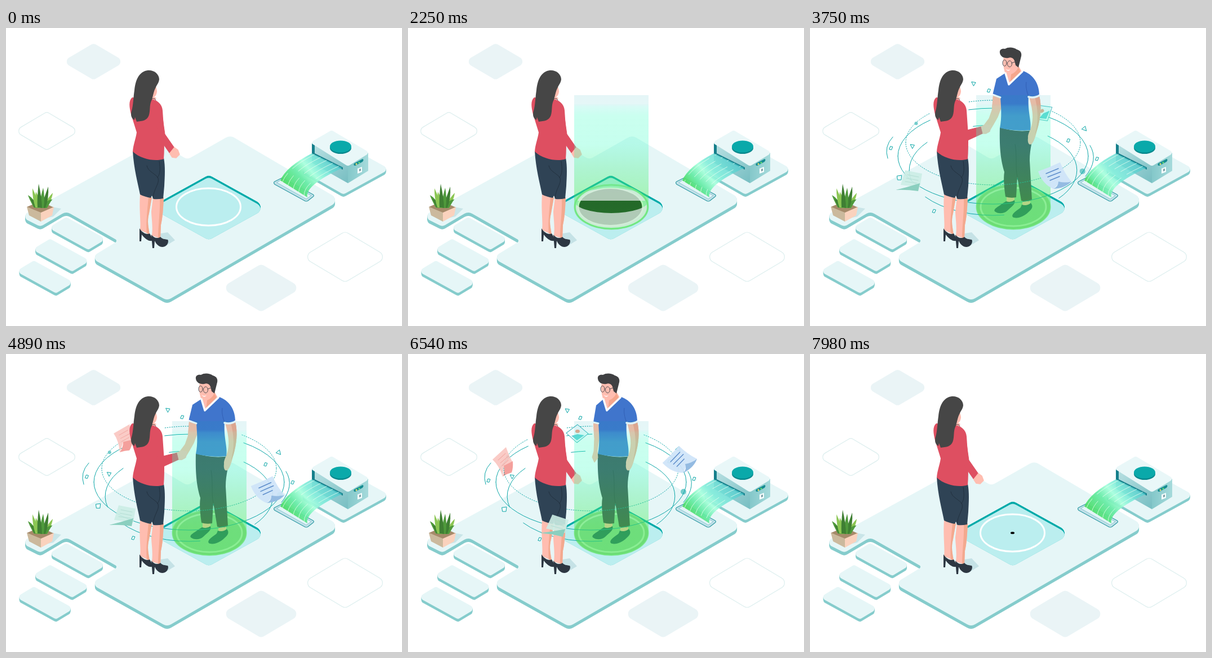
These frames come from a looping animation (703 px wide and 528 px high, 8 s). An HTML page with a canvas:

```html
<!DOCTYPE html>
<html lang="en">
<head>
<meta charset="utf-8">
<title>Hologram meeting</title>
<style>
html, body { margin: 0; width: 100%; height: 100%; overflow: hidden; background: #fff; }
canvas { display: block; }
</style>
</head>
<body>
<canvas id="stage" width="703" height="528"></canvas>
<script>
const c = document.getElementById('stage').getContext('2d');
const LOOP = 8000, TEAL = '#0aa5a6', SKIN = '#ffbdb0';
const clamp = x => Math.max(0, Math.min(1, x));
const lerp = (a, b, k) => a + (b - a) * k;
const ramp = (t, a, b) => { const k = clamp((t - a) / (b - a)); return k * k * (3 - 2 * k); };
const pulse = (t, a, b, d, e) => ramp(t, a, b) * (1 - ramp(t, d, e));

function shape(d, fill, stroke, w = 1) {
  const p = new Path2D(d);
  if (fill) { c.fillStyle = fill; c.fill(p); }
  if (stroke) { c.strokeStyle = stroke; c.lineWidth = w; c.stroke(p); }
}
function oval(x, y, rx, ry, fill, stroke, w = 1) {
  c.beginPath();
  c.ellipse(x, y, rx, ry, 0, 0, Math.PI * 2);
  if (fill) { c.fillStyle = fill; c.fill(); }
  if (stroke) { c.strokeStyle = stroke; c.lineWidth = w; c.stroke(); }
}
// points are [x, y, cornerRadius]
function rounded(pts) {
  const p = new Path2D(), n = pts.length, last = pts[n - 1];
  p.moveTo((last[0] + pts[0][0]) / 2, (last[1] + pts[0][1]) / 2);
  pts.forEach((a, i) => {
    const b = pts[(i + 1) % n];
    p.arcTo(a[0], a[1], b[0], b[1], a[2]);
  });
  p.closePath();
  return p;
}
const rhomb = (x, y, w, h, r) => rounded([[x, y - h, r], [x + w, y, r], [x, y + h, r], [x - w, y, r]]);
function slab(path, depth, top = '#e6f6f7', side = '#85cccc') {
  c.save();
  c.fillStyle = side;
  for (let i = 0; i < depth; i++) { c.translate(0, 1); c.fill(path); }
  c.restore();
  c.fillStyle = top;
  c.fill(path);
}
function poly(pts, fill, soft = 0) {
  c.beginPath();
  for (let i = 0; i < pts.length; i += 2) c.lineTo(pts[i], pts[i + 1]);
  c.closePath();
  c.fillStyle = fill;
  c.fill();
  if (soft) { c.strokeStyle = fill; c.lineWidth = soft; c.lineJoin = 'round'; c.stroke(); }
}
const morph = (a, b, k) => a.map((v, i) => lerp(v, b[i], k));
function linear(x0, y0, x1, y1, stops) {
  const g = c.createLinearGradient(x0, y0, x1, y1);
  stops.forEach(([k, col]) => g.addColorStop(clamp(k), col));
  return g;
}

const floor = rounded([[398, 190, 16], [594, 305, 10], [286, 483, 14], [150, 407, 8], [199, 377, 3],
  [107, 325, 14], [61, 352, 10], [25, 334, 8], [268, 201, 8], [322, 233, 12]]);
const pad = rounded([[605, 208, 6], [681, 250, 6], [599, 295, 8], [520, 250, 6]]);
const step = rounded([[107, 335, 6], [178, 374, 6], [146, 393, 6], [75, 354, 6]]);
const inset = rhomb(360, 318, 105, 58, 12);

function ground() {
  for (const [x, y, w, h, r] of [[155.5, 59.5, 55.5, 32.5, 8], [453, 460.5, 72, 42.5, 10]]) {
    c.fillStyle = '#eaf4f6';
    c.fill(rhomb(x, y, w, h, r));
  }
  c.strokeStyle = '#dceeee';
  c.lineWidth = 1.2;
  c.stroke(rhomb(72.5, 182.5, 57.5, 34, 8));
  c.stroke(rhomb(602, 405.5, 76, 45, 10));
  slab(floor, 6);
  for (let i = 0; i < 3; i++) {
    c.save();
    c.translate(-28.7 * i, 38.5 * i);
    slab(step, 5);
    c.restore();
  }
  slab(pad, 5);
  c.save();
  c.clip(inset);
  c.fillStyle = '#00aaa9';
  c.fill(inset);
  c.translate(0, 4);
  c.fillStyle = '#bbeeef';
  c.fill(inset);
  c.restore();
}

function plant() {
  shape('M66 338L82 317L98 320L84 334Z', '#c9e5e8');
  shape('M37 317L61 307L85 318L62 328Z', '#a68a6a');
  const tips = [[39, 296], [83, 292], [43, 304], [83, 304], [47, 284], [75, 281], [66, 283], [53, 290], [58, 276]];
  const greens = ['#4f9a3c', '#8bc653', '#3f7f33'];
  tips.forEach(([x, y], i) => {
    const b = lerp(61, x, .35);
    shape(`M${b - 4} 318Q${lerp(b, x, .6) - 4} 302 ${x} ${y}Q${lerp(b, x, .6) + 5} 302 ${b + 4} 319Z`, greens[i % 3]);
  });
  shape('M37 317L62 327L62 343L41 332Z', '#cbb99d');
  shape('M62 327L85 317L82 332L62 343Z', '#fad2bd');
}

function printer(t) {
  shape('M543 203L607 241V275L543 239Z', linear(543, 210, 607, 270, [[0, '#b8e0e2'], [1, '#79bfc3']]));
  shape('M607 241L643 221V253L607 275Z', linear(607, 250, 643, 250, [[0, '#84c8ca'], [1, '#a5dadb']]));
  c.fillStyle = '#e9f7f8';
  c.fill(rounded([[578, 181, 5], [646, 221, 4], [607, 245, 6], [540, 203, 4]]));
  shape('M543 205L548 208V222L598 247V251L543 223Z', '#167f8b');
  oval(594, 212.5, 19, 10.5, '#08888d');
  oval(594, 210, 19, 10.5, '#0aa9aa');
  shape('M618 240L633 232Q636 233 633 237L620 244Q616 244 618 240Z', '#168c91');
  oval(622, 241, 1.5, 1.5, '#f5e26c');
  oval(627, 238.5, 1.5, 1.5, '#68dd72');
  shape('M624 249L632 246V255L624 258Z', '#f5fcfc');
  shape('M627 250L630 249V253L627 254Z', '#7d9da5');

  shape('M489 266Q491 265 493 267L545 295Q548 297 545 299L536 306Q533 308 530 306L477 277Q474 274 477 272Z', '#c2e1e9', '#329ca5', 1.2);
  shape('M489 269L542 297L533 303L481 274Z', '#e3f4f7', '#79bdc8', .8);
  const sheen = .5 + .22 * Math.sin(t / LOOP * Math.PI * 10);
  const grad = linear(580, 222, 506, 288, [[0, 'rgba(65,195,205,.65)'], [sheen - .15, 'rgba(120,235,215,.85)'],
    [sheen, 'rgba(165,255,220,.9)'], [sheen + .2, 'rgba(100,235,165,.92)'], [1, 'rgba(78,220,102,.95)']]);
  shape('M543 222Q497 246 487 270L535 300Q530 279 597 248Z', grad);
  c.save();
  c.setLineDash([46, 12]);
  c.lineDashOffset = -t / LOOP * 58 * 8;
  for (let i = 0; i < 5; i++) {
    const u = .08 + i * .2, at = (a, b) => lerp(a, b, u);
    shape(`M${at(543, 597)} ${at(222, 248)}Q${at(497, 532)} ${at(246, 277)} ${at(487, 535)} ${at(270, 300)}`,
      null, 'rgba(235,255,240,.75)', 1);
  }
  c.restore();
}

function woman(k) {
  shape('M262 366L287 362L300 376L282 387Z', '#c5e2e6');
  shape('M238 294L259 300L254 328C250 343 253 353 255 366L238 358C240 345 236 325 238 294Z', SKIN);
  shape('M253 300L259 300L254 328C250 343 253 353 255 366L250 364C248 345 251 322 253 300Z', '#f3a98f');
  shape('M261 300H280C279 322 278 336 275 349L274 373L259 368C261 350 258 336 258 325Z', SKIN);
  shape('M273 300H280C279 322 278 336 275 349L274 373L270 372C270 350 274 325 273 300Z', '#f3a98f');
  shape('M237 355L237 378H240L241 366C247 374 255 380 262 376L255 364C250 367 242 363 237 355Z', '#2d3742');
  shape('M258 366L260 390H263L264 377C268 386 275 390 282 387C288 384 289 377 287 375C281 374 277 374 274 370C270 374 262 372 258 366Z', '#2d3742');
  shape('M225 218C240 228 265 233 280 230C283 245 282 262 281 280L279 302Q270 304 262 303L259 297L257 301Q246 299 238 295C234 275 227 250 225 218Z', '#2f4355');
  shape('M250 244C252 255 266 258 270 266C273 276 262 284 261 302M272 236C274 250 274 258 269 265', null, '#22313f', 1);
  shape('M255 118L267 124L262 130L254 128Z', SKIN);
  shape('M263 98C266 102 268 109 268 113C267 119 265 122 260 123L256 110Z', SKIN);
  shape('M224 123C217 129 219 141 222 153L232 185C230 198 226 206 225 219C240 233 266 237 280 232C281 220 281 206 281 190L278 146C277 134 268 127 256 126Z', '#de4f61');
  poly(morph([298, 211, 305, 216, 308, 224, 302, 230, 295, 229, 290, 221],
    [303, 175, 312, 171, 321, 173, 319, 183, 312, 187, 305, 187], k), SKIN, 1.5);
  poly(morph([278, 160, 282, 188, 298, 211, 290, 221, 276, 201, 267, 175],
    [277, 160, 279, 181, 303, 175, 306, 187, 280, 199, 267, 185], k), '#de4f61', 1);
  shape('M258 126Q264 123 266 128', null, '#5c3c45', 1);
  shape('M252 75C262 74 272 81 272 91C271 98 268 100 266 105C262 112 261 121 259 127C255 135 256 140 255 148C254 159 249 164 239 165L232 166L229 158L228 163C222 160 221 153 223 147C226 137 226 123 228 110C230 92 236 77 252 75Z', '#464646');
}

function man(k) {
  shape('M349 297H363V308H349ZM377 304H391V314H377Z', '#ffc2a8');
  shape('M348 307Q356 310 363 305C366 312 357 317 350 324C343 330 333 329 328 325C325 320 336 316 340 312Z', '#1a625f');
  shape('M376 313Q385 316 392 310C397 316 394 321 388 326C380 334 367 339 360 335C356 329 370 322 374 318Z', '#1a625f');
  shape('M337 176C355 182 375 184 396 181C396 200 390 212 390 235L394 305Q384 309 375 306L368 264L366 300Q356 302 347 299C345 285 343 268 345 255C339 235 336 215 337 176Z', '#374249');
  shape('M364 206C368 225 364 246 368 264', null, '#29343a', 1);
  shape('M389 122L407 120C412 140 409 160 404 178C400 193 398 201 393 206C388 208 386 202 387 195C386 188 392 180 394 170C397 155 394 140 389 122Z', '#ffbda5');
  shape('M399 122L407 120C412 140 409 160 404 178L399 190C406 165 405 145 399 122Z', '#f5a68c');
  poly(morph([329, 121, 338, 122, 339, 150, 336, 172, 337, 184, 331, 192, 327, 183, 330, 172, 331, 150, 330, 135],
    [325, 120, 338, 122, 339, 142, 333, 158, 325, 172, 317, 185, 307, 182, 309, 172, 318, 160, 323, 146], k), '#ffbda5', 1);
  shape('M344 50L364 52L370 67L376 77L354 101L347 82C343 70 342 60 344 50Z', SKIN);
  shape('M357 82Q366 79 370 69L374 78L355 99Z', '#f5a68c');
  poly(morph([348, 79, 334, 91, 329, 121, 341, 124], [348, 79, 331, 90, 324, 119, 341, 124], k), '#4075cc');
  shape('M347 79L353 100L378 76C396 82 407 98 407 119C401 123 394 123 388 121C386 150 394 165 391 181C375 183 352 181 337 177C341 158 339 140 338 122Z', '#4075cc');
  shape('M388 121C384 111 383 103 384 96', null, '#315fb5', 1);
  shape('M347 80L353 100L377 77M388 122Q398 125 408 119', null, '#f7fbff', 3.5);
  const cuff = morph([329, 121, 338, 123], [324, 118, 338, 123], k);
  shape(`M${cuff[0]} ${cuff[1]}L${cuff[2]} ${cuff[3]}`, null, '#f7fbff', 3);
  shape('M337 44C336 38 341 36 346 37C352 33 362 34 367 38C375 40 376 46 375 50L372 62L370 70L365 66L363 58C361 53 357 51 352 53C345 54 338 51 337 44Z', '#3f4042');
  oval(345.5, 62, 3.5, 5.5, null, '#4c4c50', 1);
  oval(354.5, 63.5, 4, 5.5, null, '#4c4c50', 1);
  shape('M358 62L367 59', null, '#4c4c50', 1);
  shape('M347 72Q351 76 356 73Q352 79 347 72Z', '#fff');
}

const BIG = [325, 227, 169, 85], LOW = [325, 252, 149, 80], DOTS = [325, 203, 155, 75];
function arcs(list) {
  for (const [ring, a, b] of list) {
    c.beginPath();
    c.ellipse(...ring, 0, a, b);
    c.setLineDash(ring === DOTS ? [1.5, 2.5] : []);
    c.strokeStyle = TEAL;
    c.lineWidth = 1;
    c.stroke();
  }
  c.setLineDash([]);
}
// kind, start and end place
const bits = [['v', 293, 98, 283, 100], ['v', 181, 207, 185, 217], ['a', 489, 181, 479, 168], ['d', 321, 110, 306, 113],
  ['d', 144, 209, 143, 224], ['d', 457, 202, 464, 190], ['d', 510, 235, 508, 221], ['d', 216, 323, 234, 328],
  ['q', 155, 262, 171, 275], ['o', 192, 165, 177, 182, 3], ['o', 482, 257, 489, 244, 5]];
function orbits(t) {
  arcs([[BIG, -1.83, -1.56], [BIG, -.96, 0], [BIG, Math.PI, 3.99], [LOW, -1.81, -1.64], [LOW, -.86, .67],
    [LOW, 2.9, 3.81], [DOTS, -1.85, -1.56], [DOTS, -.92, 0], [DOTS, Math.PI, 3.9]]);
  shape('M147 193Q131 210 138 231M497 208Q513 234 489 263', null, TEAL);
  const k = (t - 2880) / 3660;
  for (const [kind, x0, y0, x1, y1, r] of bits) {
    c.save();
    c.translate(lerp(x0, x1, k), lerp(y0, y1, k));
    if (kind === 'o') oval(0, 0, r, r, '#73cccc');
    else {
      const d = { v: 'M-3.5 -3L3.5 -2L0 4Z', a: 'M-4 1L2 -4L4 4Z', d: 'M-3 2L-1 -3L3 -2L1 3Z', q: 'M-4 -3L4 -4L3 4L-3 4Z' };
      shape(d[kind], '#f4fcfc', TEAL);
    }
    c.restore();
  }
}

// cubic through four known places
const TIMES = [2880, 3750, 4890, 6540];
const along = (v, t) => v.reduce((sum, p, i) =>
  sum + TIMES.reduce((m, u, j) => j === i ? m : m * (t - u) / (TIMES[i] - u), p), 0);
function place(t, xs, ys, turn, draw) {
  c.save();
  c.translate(along(xs, t), along(ys, t));
  c.rotate(turn);
  draw();
  c.restore();
}
function backSheets(t) {
  const k = (t - 2880) / 3660;
  place(t, [284, 250, 210, 170], [127, 130, 148, 190], .5 * (1 - k), () => {
    shape('M-20 -3L4 -25L10 -9L16 2L0 9L-2 27Q-8 8 -20 -3Z', 'rgba(250,198,192,.9)');
    shape('M-2 27Q2 19 0 8L16 0Q17 12 14 20Q6 22 -2 27Z', '#f4a09c');
    shape('M-10 -2L3 -14M-6 3L8 -9M-3 8L8 -2', null, '#f2aaa5', 1);
  });
  place(t, [438, 413, 365, 300], [161, 151, 139, 141], -.75 * (1 - k), () => {
    shape('M-19 -1L1 -16L20 0L0 16Z', '#f2fbfd', '#49b9bf', 1);
    shape('M-10 4L1 1L13 3L0 12Z', '#63d1d5');
    oval(1, -4, 4, 3, '#f2a189');
  });
}
function frontSheets(t) {
  place(t, [403, 433, 463, 481], [270, 263, 242, 190], -.42 * ramp(t, 4500, 6700), () => {
    shape('M-28 -9Q-8 -16 11 -25Q19 -5 31 9L8 13L-1 22Q-20 14 -28 -9Z', 'rgba(207,229,249,.93)');
    shape('M-1 22Q8 18 8 9Q20 12 31 9Q20 21 -1 22Z', '#94bbe2');
    shape('M-14 -5L8 -14M-11 1L12 -8M-7 7L10 0', null, '#5d8dcb', 1.5);
  });
  place(t, [157, 175, 206, 260], [248, 270, 286, 303], .12 * ramp(t, 4890, 6540), () => {
    shape('M-6 -18L24 -12L20 12L-14 8Z', 'rgba(205,238,230,.9)');
    shape('M-2 -10L18 -6M-4 -4L17 0M-6 2L15 5', null, '#b4ded4', 1);
    shape('M-23 17Q-2 12 20 5L17 19Q-4 16 -23 17Z', '#8bcfbf');
  });
}

const CX = 361, CY = 317, RX = 66, RY = 40;
function beam(top, arrived) {
  if (top > CY + 20) return;
  const at = y => (y - 119) / 238;
  c.beginPath();
  c.moveTo(CX - RX, Math.min(top, CY));
  c.lineTo(CX + RX, Math.min(top, CY));
  c.lineTo(CX + RX, CY);
  c.ellipse(CX, CY, RX, RY, 0, 0, Math.PI);
  c.closePath();
  c.fillStyle = linear(0, 119, 0, 357, [[0, 'rgba(0,160,175,.1)'], [at(134), 'rgba(0,175,180,.1)'],
    [at(139), 'rgba(50,235,205,.19)'], [at(156), 'rgba(72,255,200,.29)'], [at(205), 'rgba(72,255,200,.31)'],
    [at(250), 'rgba(75,240,140,.36)'], [at(305), 'rgba(78,238,86,.42)'], [1, 'rgba(78,238,86,.45)']]);
  c.fill();
  c.save();
  c.beginPath();
  c.ellipse(CX, CY, RX - 3, RY - 3, 0, 0, Math.PI * 2);
  c.clip();
  c.beginPath();
  c.rect(290, 306, 145, 60);
  c.ellipse(CX, 306, RX, 22, 0, 0, Math.PI * 2);
  c.fillStyle = `rgba(222,234,228,${.75 * (1 - arrived)})`;
  c.fill('evenodd');
  c.restore();
}

function draw(t) {
  c.clearRect(0, 0, 703, 528);
  c.lineCap = 'round';
  const hole = clamp((t - 850) / 420) * clamp((8000 - t) / 300);
  const up = pulse(t, 1180, 1670, 7540, 7820);
  const rise = 1 - Math.pow(1 - clamp((t - 2270) / 680), 3);
  const drop = 303 * (1 - rise) + 303 * Math.pow(clamp((t - 7180) / 430), 2);
  const arrived = 1 - clamp(drop / 50);
  const rings = pulse(t, 2450, 2750, 7200, 7500);
  const sheets = pulse(t, 2500, 3260, 7200, 7500);
  const shake = pulse(t, 3200, 3600, 5250, 5650) * (.96 + .04 * Math.sin((t - 3600) / 95));

  ground();
  plant();
  printer(t);
  c.globalAlpha = rings;
  if (rings) orbits(t);
  c.globalAlpha = sheets;
  if (sheets) backSheets(t);
  c.globalAlpha = up;
  oval(CX, CY, RX - 1, RY - 1, '#bdeee0', '#8ce3a0', 3);
  c.globalAlpha = 1;
  oval(359.5, CY, 57, 33, null, '#fff', 3);
  if (hole) oval(359.5, CY, 56 * hole, 32 * hole, '#050808');

  if (hole && drop < 303) {
    c.save();
    c.beginPath();
    c.rect(0, 0, 703, CY);
    c.ellipse(CX, CY, 57 + 8 * arrived, 33 + 6 * arrived, 0, 0, Math.PI * 2);
    c.clip();
    c.translate(0, drop);
    oval(360, CY, 55, 32, '#a9d6b4');
    c.globalAlpha = arrived;
    oval(CX, CY, RX - 1, RY - 1, '#85cf8e');
    oval(CX, CY, 58, 34, '#86d297', '#b9edc4', 3);
    c.globalAlpha = 1;
    man(shake);
    c.restore();
  }
  c.globalAlpha = rings;
  if (rings) arcs([[BIG, 0, Math.PI], [LOW, 1.44, 2.51], [DOTS, 0, Math.PI]]);
  c.globalAlpha = 1;
  woman(shake);
  beam(lerp(357, 119, up), arrived);
  c.globalAlpha = sheets;
  if (sheets) frontSheets(t);
  c.globalAlpha = 1;
}

const start = performance.now();
function tick() {
  draw((performance.now() - start) % LOOP);
  requestAnimationFrame(tick);
}
tick();
</script>
</body>
</html>
```
